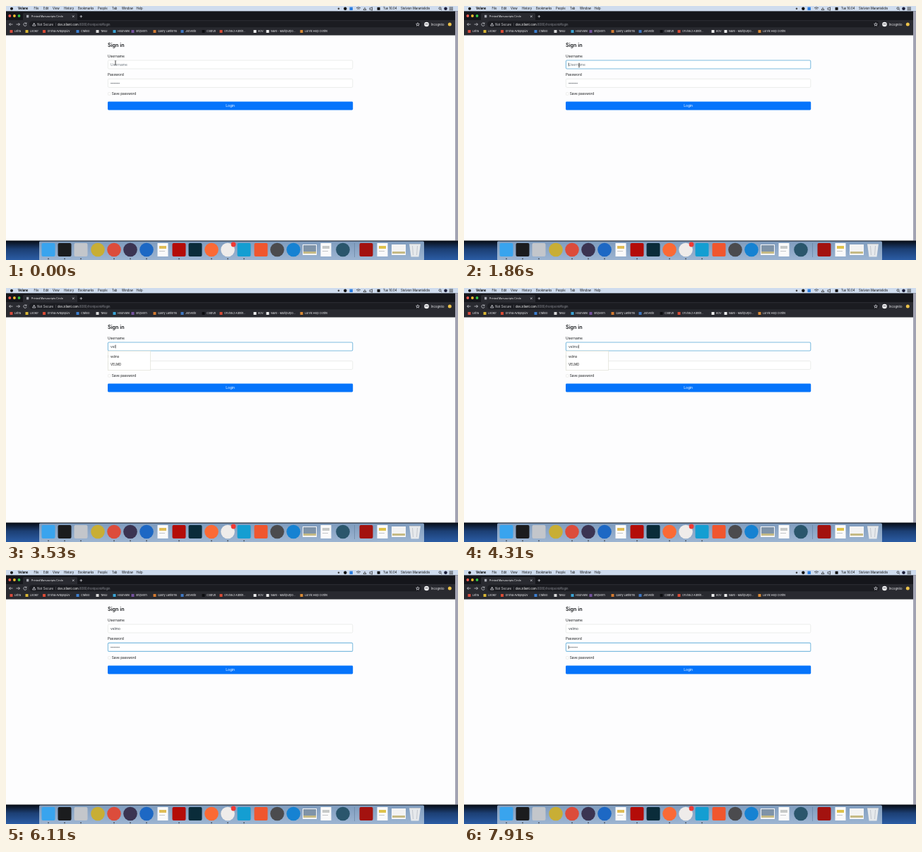
Animation, 640 px wide and 360 px high, one loop 8 s. Source, as an HTML page:

```html
<!DOCTYPE html>
<html lang="en">
<head>
<meta charset="utf-8">
<title>Sign in</title>
<style>
  html, body { margin: 0; width: 100%; height: 100%; overflow: hidden; background: #fff; }
  svg { display: block; width: 100vw; height: 100vh; font-family: Inter, "Noto Sans", sans-serif; }
  .thin { fill: none; stroke: #dcdde2; stroke-width: .7; }
</style>
</head>
<body>
<svg viewBox="0 0 640 360">
  <defs>
    <linearGradient id="desk" gradientUnits="userSpaceOnUse" x1="0" y1="332" x2="0" y2="360">
      <stop stop-color="#06090f"/><stop offset=".45" stop-color="#1c3f74"/><stop offset="1" stop-color="#2b5ca4"/>
    </linearGradient>
    <linearGradient id="shelf" x2="0" y2="1">
      <stop stop-color="#7f9cbe"/><stop offset="1" stop-color="#9db5d2"/>
    </linearGradient>
  </defs>
  <g id="desktop"></g>
  <g id="browser"></g>
  <g id="form"></g>
  <g id="menu">
    <rect id="suggestions" x="144.5" y="89.3" width="60" height="27.4" fill="#fff" stroke="#e0e1d6" stroke-width=".7"/>
  </g>
  <path id="caret" stroke="#222" stroke-width=".6"/>
  <path id="pointer" d="M-1.2-3Q0-3 0-2.2V2.2Q0 3-1.2 3M1.2-3Q0-3 0-2.2V2.2Q0 3 1.2 3" fill="none" stroke="#444" stroke-width=".6"/>
</svg>
<script>
const LOOP = 8000, USER = 'velmo';
const KEY_TIMES = [2080, 3050, 3350, 3650, 3950];
const CLICK = 1350, TAB = 4830, BLINK = 1200;
const $ = id => document.getElementById(id);
const add = (id, ...parts) => $(id).insertAdjacentHTML('beforeend', parts.join(''));

const rect = (x, y, w, h, fill, more = '') =>
  `<rect x="${x}" y="${y}" width="${w}" height="${h}" fill="${fill}" ${more}/>`;
const disc = (x, y, r, fill) => `<circle cx="${x}" cy="${y}" r="${r}" fill="${fill}"/>`;
const text = (x, y, size, fill, str, more = '') =>
  `<text x="${x}" y="${y}" font-size="${size}" fill="${fill}" ${more}>${str}</text>`;
const thin = (d, more = '') => `<path class="thin" d="${d}" ${more}/>`;

// Desktop and dock
const dock = [
  [60, 's', '#39a4ee'], [83, 's', '#1b1c1e'], [106, 's', '#c3c6cb'], [130, 'c', '#c8ae35'],
  [153, 'c', '#dc4c3b'], [176, 'c', '#3b3452'], [199, 'c', '#1d68c4'], [222, 'page', '#e0bd56'],
  [245, 's', '#b40c08'], [268, 's', '#0a2c3a'], [291, 'c', '#fb6a35'], [314, 'c', '#efecea'],
  [337, 's', '#149ed2'], [361, 's', '#f0562e'], [384, 'c', '#4b4b4e'], [407, 'c', '#1682d2'],
  [430, 'photo', '#7f93a8'], [453, 'page', '#c6c9c8'], [477, 'c', '#2a566c'], [510, 's', '#a3120f'],
  [533, 'page', '#dfc24b'], [556, 'photo', '#f3f3f3'], [579, 'bin', '#e6e9ec']
];
const dockItem = ([x, kind, color]) => ({
  s: () => rect(x - 9.5, 336, 19, 19, color, 'rx="2"'),
  c: () => disc(x, 345.5, 9.8, color),
  page: () => rect(x - 7.5, 336, 15, 19, '#fafafa') + rect(x - 5, 340, 10, 4, color) + rect(x - 5, 347, 8, 1, '#c3c5c9'),
  photo: () => rect(x - 10, 338, 20, 15, '#f6f6f6') + rect(x - 9, 339, 18, 9, color) + rect(x - 9, 348, 18, 3, '#c5ba85'),
  bin: () => `<path d="M${x - 8} 337h16l-2.5 18.5h-11z" fill="${color}"/>` +
    thin(`M${x - 8} 337.5h16M${x - 3.5} 340l1 13M${x + 3.5} 340l-1 13`, 'style="stroke:#b2b8c0"')
})[kind]();
add('desktop',
  rect(0, 0, 640, 360, 'url(#desk)'),
  rect(47, 333.5, 545, 27, 'url(#shelf)', 'rx="1.5"'),
  dock.map(dockItem).join(''),
  disc(322, 338, 3.4, '#ef3a34'),
  rect(493.3, 336, .6, 20, '#647e9c'),
  [60, 83, 106, 153, 176, 199, 245, 291, 314, 337].map(x => disc(x, 358.3, .8, '#222')).join(''));

// System menu bar
add('browser',
  rect(0, 0, 640, 7.6, '#cfdcee'),
  disc(8, 3.8, 2, '#111'),
  text(17, 5.3, 4.3, '#050505', 'Velane', 'font-weight="700"'),
  [[39.5, 'File'], [53, 'Edit'], [66, 'View'], [82, 'History'], [102, 'Bookmarks'], [130, 'People'],
   [150, 'Tab'], [164, 'Window'], [184.5, 'Help'], [534, 'Tue 16:04'], [559, 'Stelvion Marantelidis']]
    .map(([x, s]) => text(x, 5.3, 4.2, '#0c0c0c', s)).join(''),
  disc(471, 3.8, 1.3, '#444'), disc(480.3, 3.8, 2.2, '#111'), rect(486.5, 1.6, 4.4, 4.4, '#2a7de0'),
  thin('M496 2.8q3-2 6 0M497.4 4.3q1.6-1.1 3.2 0M506 5.5l2-3 2 3zM515 2.8h1.5l2-1v4.4l-2-1H515z', 'style="stroke:#222"'),
  rect(525.6, 1.8, 4, 4, '#111'),
  '<circle class="thin" cx="614.5" cy="3.3" r="1.5" style="stroke:#111"/>',
  disc(622.5, 3.8, 2.3, '#1c1f3a'),
  thin('M615.6 4.5l1.5 1.5M627.5 2h5.5M627.5 3.8h5.5M627.5 5.6h5.5', 'style="stroke:#111"'));

// Browser window
const bookmarks = [
  [12, 'Letra', '#d84a3c'], [34, 'Locker', '#d9b634'], [58.5, 'OrViva Αναφορών', '#d94b35'],
  [106, 'Cratelo', '#3c7fd0'], [134, 'Tavul', '#d8d8d8'], [158, 'Hourvane', '#39a3d5'],
  [184, 'ShipVorn', '#7653a0'], [215, 'Query Lanterns', '#d47a30'], [254, 'JobVelto', '#3f78c4'],
  [284, 'Codrun', '#0c0d10'], [309, 'OrViva 2 Admin...', '#d94b35'], [357, 'KOV', '#ededed'],
  [375, 'Navo - Multipurpo...', '#ededed'], [423, 'Lurvix Help Centre', '#d98a35']
];
add('browser',
  rect(0, 7.6, 636, 13, '#15161b'),
  rect(24, 10, 77, 11, '#292a30', 'rx="1.5"'),
  rect(0, 20, 636, 21.5, '#292a30'),
  rect(33, 21.3, 555, 9, '#1b1c21', 'rx="4.5"'),
  rect(0, 41.5, 636, 291, '#fdfdfe'),
  rect(636, 7.6, 4, 325, '#a2a3b2'),
  ['#fa5c51', '#f6bd2e', '#35c548'].map((c, i) => disc(5.3 + i * 6.6, 14, 1.9, c)).join(''),
  rect(29, 12.8, 3.2, 3.6, '#a9abb4'),
  text(36, 16.3, 3.6, '#f4f4f6', 'Printed Manuscripts Circle'),
  thin('M94 13.4l2.6 2.6M96.6 13.4l-2.6 2.6M104.5 14.8h3.6M106.3 13v3.6'),
  thin('M9.5 26h-5m2-2l-2 2 2 2M14.5 26h5m-2-2l2 2-2 2M28.8 24.8a2.2 2.2 0 1 0 .4 1.8M29 23.5v1.6h-1.7'),
  thin('M37.5 28l2.2-4 2.2 4zM39.7 25.3v1.2'),
  text(44.3, 27.5, 4.3, '#dcdce0', 'Not Secure'),
  rect(70, 23.8, .4, 4.4, '#77787e'),
  text(73, 27.5, 4.2, '#fff', 'dev.zilient.com<tspan fill="#8d8f96">:8080/frontpoint#login</tspan>'),
  thin('M583 23.7l.7 1.6 1.7.1-1.3 1.1.4 1.7-1.5-.9-1.5.9.4-1.7-1.3-1.1 1.7-.1z'),
  disc(595.5, 26, 3.3, '#f4f4f6'),
  rect(593.5, 25.2, 4, .7, '#292a30'),
  text(602, 27.5, 4.2, '#f0f0f2', 'Incognito'),
  disc(628.3, 26, 2.5, '#ecc24a'),
  bookmarks.map(([x, s, c]) => rect(x - 6.5, 34, 4, 4, c) + text(x, 37.4, 3.7, '#f6f6f8', s)).join(''));

// Sign-in form
const field = (id, y) => rect(144.4, y, 346.4, 12, '#fff', `id="${id}" rx="1.4"`);
add('form',
  text(144, 58, 7.2, '#16181b', 'Sign in', 'font-weight="600"'),
  text(144, 72.8, 4.9, '#16181b', 'Username'),
  text(144, 99.4, 4.9, '#16181b', 'Password'),
  field('userField', 77), field('passField', 103.4),
  text(148, 84.8, 4.9, '#6c757d', '', 'id="userText"'),
  '<path d="M149 109.5h11.5" stroke="#495057" stroke-width="1.3" stroke-linecap="round" stroke-dasharray="0 2.2"/>',
  rect(144.5, 122.6, 3.6, 3.6, '#fff', 'rx=".6" stroke="#e2e3e0" stroke-width=".6"'),
  text(149.7, 126.2, 4.8, '#16181b', 'Save password'),
  rect(144, 135.6, 347.2, 11.9, '#0574fb', 'rx="1.4"'),
  text(317.6, 143.4, 4.9, '#fff', 'Login', 'text-anchor="middle"'));
add('menu', text(148, 98.6, 4.3, '#111', USER), text(148, 109.8, 4.3, '#111', USER.toUpperCase()));

const show = (id, on) => $(id).setAttribute('visibility', on ? 'visible' : 'hidden');
function setFocus(id, on) {
  $(id).setAttribute('stroke', on ? '#80bde0' : '#e3e5e2');
  $(id).setAttribute('stroke-width', on ? 1.1 : .7);
}

function render(now) {
  const t = now % LOOP;
  const typed = KEY_TIMES.filter(k => t >= k).length;
  const inUser = t >= CLICK && t < TAB, inPass = t >= TAB;
  setFocus('userField', inUser);
  setFocus('passField', inPass);

  const label = $('userText');
  label.textContent = typed ? USER.slice(0, typed) : 'Username';
  label.setAttribute('fill', typed ? '#343a40' : '#6c757d');
  show('menu', typed && inUser);

  const caretStart = inPass ? (t < 5070 ? TAB : 5070) : typed ? KEY_TIMES[typed - 1] : CLICK;
  const caretX = 148.2 + (inUser && typed ? label.getComputedTextLength() + .3 : 0);
  $('caret').setAttribute('d', `M${caretX} ${inPass ? 107 : 80.5}v5`);
  show('caret', (inUser || inPass) && (t - caretStart) % BLINK < BLINK / 2);

  const p = Math.min(t / 950, 1), ease = p * p * (3 - 2 * p);
  $('pointer').setAttribute('transform', `translate(${155 + 8 * ease} ${80.5 + 3.5 * ease})`);
  show('pointer', !typed);
}

const start = performance.now();
(function tick() {
  render(performance.now() - start);
  requestAnimationFrame(tick);
})();
</script>
</body>
</html>
```
